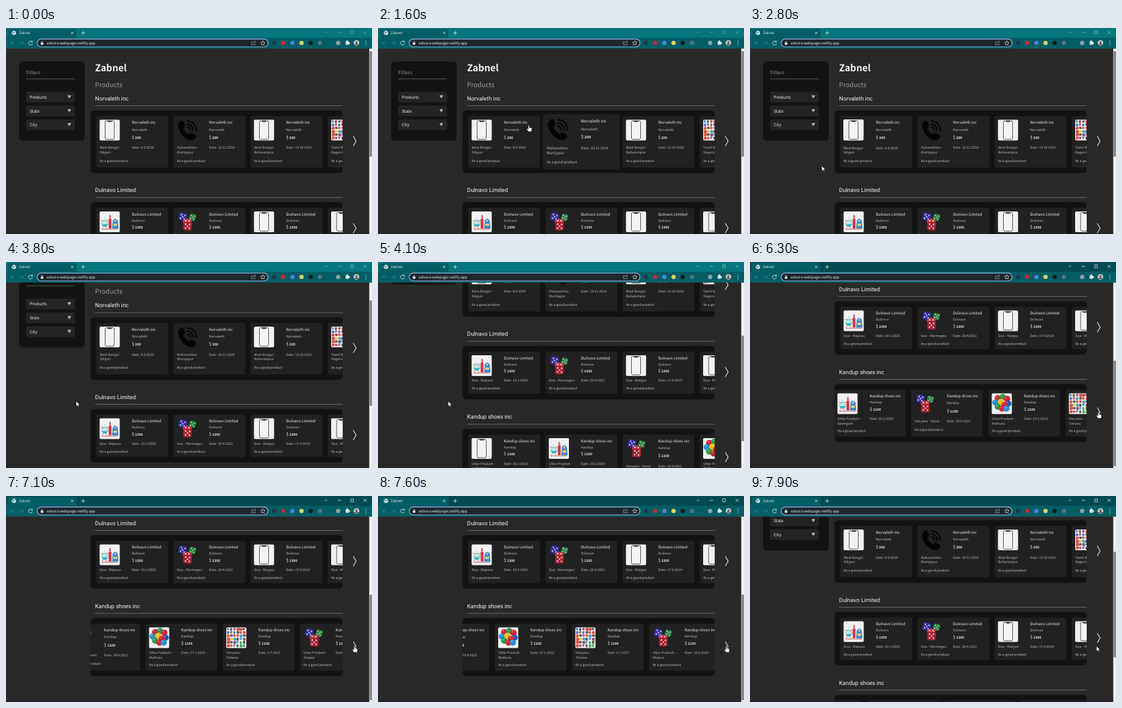
These frames come from a looping animation (600x338 px, 8 s). An HTML page:

```html
<!DOCTYPE html>
<html lang="en">
<head>
<meta charset="utf-8">
<title>Product page</title>
<style>
  html, body { margin: 0; width: 100%; height: 100%; overflow: hidden; background: #292829; }
  svg { display: block; width: 600px; height: 338px; text-rendering: geometricPrecision; }
  text { font-family: "Noto Sans CJK JP", "Noto Sans CJK SC", "Noto Sans", sans-serif; white-space: pre; }
  .ui { font-family: "Open Sans", "Noto Sans", sans-serif; }
  .head { font-family: Roboto, sans-serif; }
</style>
</head>
<body>
<svg id="stage" viewBox="0 0 600 338" xmlns="http://www.w3.org/2000/svg"></svg>
<script>
const LOOP = 8000, STEP = 100, PITCH = 126.5, CARD_W = 117.5, CARD_X = 148;

// --- drawing helpers -------------------------------------------------
const rect = (x, y, w, h, fill, r = 0, more = '') =>
  `<rect x="${x}" y="${y}" width="${w}" height="${h}" rx="${r}" fill="${fill}" ${more}/>`;
const circle = (x, y, r, fill, more = '') => `<circle cx="${x}" cy="${y}" r="${r}" fill="${fill}" ${more}/>`;
const line = (d, color, w = 1, more = '') =>
  `<path d="${d}" fill="none" stroke="${color}" stroke-width="${w}" ${more}/>`;
const shape = (d, fill, more = '') => `<path d="${d}" fill="${fill}" ${more}/>`;
const text = (x, y, size, fill, str, more = '') =>
  `<text x="${x}" y="${y}" font-size="${size}" fill="${fill}" ${more}>${str}</text>`;
const group = (body, more = '') => `<g ${more}>${body}</g>`;

function random(seed) {
  return () => (seed = (seed * 16807) % 2147483647) / 2147483647;
}

// --- product pictures, 33 x 34 ---------------------------------------
const paper = rect(0, 0, 33, 34, '#f1f1f1', 2);
const bright = ['#d8342c', '#2c62c8', '#e8c21c', '#2f9a4a', '#d8342c', '#2a8fd0', '#7a3c5a'];

function die(x, y, size, fill, angle) {
  const dots = [[.27, .27], [.73, .27], [.5, .5], [.27, .73], [.73, .73]]
    .map(([a, b]) => circle(a * size, b * size, size * .09, '#e3d5de')).join('');
  return group(rect(0, 0, size, size, fill, 3) + dots, `transform="translate(${x} ${y}) rotate(${angle})"`);
}

function balloons() {
  const spots = [[10, 8], [18, 6], [25, 9], [6, 15], [27, 17], [15, 14], [21, 19], [10, 22], [17, 25], [24, 25]];
  const colors = ['#d8232c', '#2f9a4a', '#d8232c', '#2a8fd0', '#2456b8', '#e8c21c'];
  return paper + spots.map(([x, y], i) => circle(x, y, 5.2, colors[i % 6]) +
    circle(x - 1.6, y - 1.9, 1, '#fff', 'opacity=".5"')).join('');
}

function groceries() {
  const rnd = random(77);
  let body = paper;
  for (let i = 0; i < 36; i++) {
    const w = 3 + rnd() * 2.2, h = 3.4 + rnd() * 1.8, x = 1.2 + (i % 6) * 5.2, y = 1 + Math.floor(i / 6) * 5.4;
    body += rect(x, y, w, h, i % 4 === 1 ? '#4a3a2e' : bright[Math.floor(rnd() * 7)], .8,
      `opacity=".85" transform="rotate(${rnd() * 40 - 20} ${x + 2} ${y + 2})"`);
  }
  return body;
}

const pictures = {
  phone: paper + rect(9, 1.8, 15, 30.5, '#f3f3f3', 2.4, 'stroke="#383838" stroke-width=".9"') +
    shape('M13 1.8h7v1q0 1-1 1h-5q-1 0-1-1z', '#383838'),
  call: shape('M3 6C5 2 9 0 11 3L13.5 9C14 11 12 12 10.5 13.5C13 19 16 22 20.500 24.500C22 22.500 23.500 21 25.500 22L31 25.500C33 27.500 31 31 27.500 33C16 37-1 19 3 6Z', '#060606') +
    line('M17 7.500Q26 8 27 18M18 12.500Q22 13 22.500 18M17 2.500Q31 3 32 18', '#060606', 2.2, 'stroke-linecap="round"'),
  lab: paper + line('M2 15h13M4 29L8 20L12 29', '#e0895c', 1.1) + rect(7, 10, 3, 6, '#cfe8ea') +
    circle(8.5, 20, 5, '#bfe6ea', 'stroke="#58b0bc" stroke-width=".7"') +
    shape('M3.700 21H13.300A4.900 4.900 0 0 1 3.700 21Z', '#35b3c7') +
    rect(14.8, 12, 4.6, 16, '#cf3848', 1) + rect(15.7, 6, 2.8, 6, '#d86a72', .8) +
    shape('M21.500 15Q25.500 9 29.500 15L31 28H20.500Z', '#3f84c4') + rect(22.5, 20, 6, 4, '#e9cf6a', .8) +
    circle(25.5, 15.5, 1.8, '#a9c8e4') + rect(3, 28.5, 27, 1.4, '#d0737c', .7),
  dice: die(5, 1, 13, '#3330a0', 14) + die(22, 3, 11, '#23803c', 16) +
    shape('M9.500 16L16 11.500L25 14L23 20L11 20Z', '#cc3a48') + die(11, 17, 14, '#ac2230', 3) +
    circle(14.5, 15.4, 1.2, '#e3d5de') + circle(20, 15.6, 1.2, '#e3d5de'),
  balloons: balloons(),
  groceries: groceries()
};

// --- page content ----------------------------------------------------
const rows = [
  { name: 'Norvaleth inc', brand: 'Norvaleth', price: 200, mid: 115, h: 84.5, ys: [10.5, 22.5, 35, 52, 73], cards: [
    ['phone', 'West Bengal -', 'Siliguri', '8:6:2020'],
    ['call', 'Maharashtra -', 'Murtijapur', '10:11:2014'],
    ['phone', 'West Bengal -', 'Baharampur', '13:10:2016'],
    ['groceries', 'Tamil Nadu -', 'Nagercoil', '4:2:2018']] },
  { name: 'Dulnavo Limited', brand: 'Dulnavo', price: 1300, mid: 265.5, h: 69.5, ys: [10.5, 21, 32, 47.5, 60], cards: [
    ['lab', 'Goa - Mapusa', '', '19:1:2020'],
    ['dice', 'Goa - Marmagao', '', '20:4:2021'],
    ['phone', 'Goa - Margao', '', '17:4:2014'],
    ['phone', 'Goa - Mapusa', '', '9:3:2016']] },
  { name: 'Kandup shoes inc', brand: 'Kandup', price: 1100, mid: 401.5, h: 77, ys: [10.5, 21, 32, 48, 67.3], cards: [
    ['phone', 'Uttar Pradesh -', 'Lakhimpur', '30:1:2013'],
    ['lab', 'Uttar Pradesh -', 'Azamgarh', '20:2:2020'],
    ['dice', 'Haryana - Hansi', '', '18:4:2021'],
    ['balloons', 'Uttar Pradesh -', 'Mathura', '27:1:2013'],
    ['groceries', 'Haryana -', 'Tohana', '5:7:2017'],
    ['dice', 'Uttar Pradesh -', 'Sitapur', '12:6:2019']] }
];

function card(row, [pic, place, town, date]) {
  const loose = !town && row.h > 70;
  const [a, b, c, d, e] = loose ? [10.5, 22, 35, 52, 65.5] : row.ys;
  const small = (x, y, str) => text(x, y + 2, 5.5, '#b8b8b8', str);
  return rect(0, 0, CARD_W, row.h, '#212121', 2) +
    group(pictures[pic], 'transform="translate(5.5 6)"') +
    text(58.3, a + 2.4, 6.25, '#f4f4f4', row.name, 'font-weight="500"') +
    small(58.3, b, row.brand) +
    text(58.3, c + 2.3, 7, '#f4f4f4', '$') +
    text(63.6, c + 2.2, 5.5, '#f4f4f4', row.price, 'font-weight="700"') +
    small(5.7, d, place) + small(5.7, d + 7.6, town) + small(58.3, d, 'Date: ' + date) +
    text(5.7, e + 2.3, 5.5, '#c4c4c4', 'Its a good product');
}

function section(row, r) {
  const top = row.mid + 20.2, boxH = row.h + 18.4, cy = top + boxH / 2 - 1.2;
  const cards = row.cards.map((c, i) => group(
    group(card(row, c), `id="card${r}${i}"`),
    `transform="translate(${CARD_X + i * PITCH} ${row.mid + 29.4})"`)).join('');
  return text(146, row.mid + 3.5, 9.375, '#f4f4f4', row.name, 'class="head"') +
    rect(146, row.mid + 12.2, 406, .8, '#777') +
    rect(138.5, top, 413.5, boxH, '#131313', 6) +
    `<clipPath id="clip${r}">${rect(138.5, top, 413.5, boxH, '#000', 6)}</clipPath>` +
    group(group(cards, `id="track${r}"`), `clip-path="url(#clip${r})"`) +
    line(`M569.300 ${cy - 8}L574 ${cy}L569.300 ${cy + 8}`, '#f2f2f2', 1.1);
}

function sidebar() {
  const selects = ['Products', 'State', 'City'].map((label, i) => {
    const y = 113.3 + i * 22.8;
    return rect(33, y - 8.8, 80, 17.6, '#242424', 2) + text(39, y + 2.4, 6.7, '#f2f2f2', label) +
      shape(`M100.700 ${y - 2.8}h6.200l-3.100 5.200z`, '#b4b4b4');
  }).join('');
  return rect(21.5, 55, 107.5, 130, '#131313', 6) + text(33, 76, 8.1, '#8e8e8e', 'Filters') +
    rect(33, 83.2, 80, .8, '#6c6c6c') + selects;
}

function browser() {
  const pale = '#d5e6e8', faint = '#3a8087', bar = '#035e66';
  const icons = [[440, '#20394a'], [455, '#d3262e'], [470, '#4b86d8'], [485, '#e3d26c'], [500, '#1a1a1c'],
    [515, '#58747a'], [545, '#8fa3a8']].map(([x, c]) => circle(x - .5, 24.5, 3.5, c)).join('');
  return rect(0, 0, 600, 17, '#05777d', 0, 'id="strip"') +
    shape('M2 17V5Q2 1.500 5.500 1.500H112Q115.500 1.500 115.500 5V17Z', bar) +
    rect(0, 16, 600, 17.7, bar) +
    circle(13, 8, 3.6, pale) + line('M10 7Q13 9 16 6M12 11Q13 8 11 5', '#3b747c', .8) +
    text(21, 10.3, 6, '#f2f8f8', 'Zabnel', 'class="ui"') +
    line('M106.500 6l4 4m0-4l-4 4M126.500 5v6m-3-3h6', pale, .9) +
    line('M14 24.500H7.500m3-3l-3 3l3 3M22 24.500h6.500m-3-3l3 3l-3 3', faint, .9) +
    line('M42.600 22.500A3.200 3.200 0 1 0 43.300 25.500M43.200 20.800v2.300h-2.400', pale, .9) +
    rect(51.2, 18.2, 378.3, 12.8, '#1d272d', 6.4, 'stroke="#9bb9e6" stroke-width="1.2"') +
    rect(57, 24, 4.2, 3.4, pale, .5) + line('M57.900 24v-1a1.200 1.200 0 0 1 2.400 0v1', pale, .7) +
    text(67, 26.7, 6.15, '#f2f4f5', 'edvora-webpage.netlify.app', 'class="ui"') +
    line('M405 22.500h-2.500v5h6v-2M404.500 25.500q.5-3 4.500-3m-1.800-1.700l1.900 1.700l-1.900 1.700', '#98a6aa', .7) +
    shape('M421 20.800l1.100 2.400l2.600.300l-1.900 1.800l.5 2.600l-2.300-1.300l-2.300 1.300l.5-2.600l-1.900-1.800l2.600-.300z', 'none', 'stroke="#d8dee0" stroke-width=".8"') +
    icons +
    rect(556.800, 22, 5.6, 5.6, pale, .8) + circle(559.6, 21.6, 1.4, pale) + circle(562.8, 24.8, 1.4, pale) +
    circle(574.5, 24.5, 4.6, '#c3cccf') + circle(574.5, 23.3, 1.6, '#6c5a52') +
    shape('M571.500 28a3 3 0 0 1 6 0z', '#6c5a52') +
    [21.5, 24.5, 27.5].map(y => circle(590, y, .75, pale)).join('') +
    group(line('M522.500 6l2 2l2-2M544 7.200h5.500M565 4.800h4.600v4.600h-4.600zM586.300 4.700l4.800 4.800m0-4.800l-4.800 4.800', '#fff', .8), 'id="controls"');
}

const arrow = shape('M0 0V8.300L2 6.500L3.300 9.500L4.700 8.900L3.400 6H6Z', '#fff', 'stroke="#111" stroke-width=".6"');
const hand = shape('M-.800 1C-.800-.300 .900-.300 .900 1V4L4.500 4.900Q5.500 5.200 5.400 6.500L4.700 11H-.500L-3.200 7Q-3.500 5.800-2.300 5.900L-.800 7Z', '#fff', 'stroke="#111" stroke-width=".6"');

const stage = document.getElementById('stage');
stage.innerHTML = rect(0, 0, 600, 338, '#292829') +
  group(sidebar() + text(146, 71.3, 15.4, '#f2f2f2', 'Zabnel', 'font-weight="700"') +
    text(146, 96.5, 10.7, '#9c9c9c', 'Products') + rows.map(section).join(''), 'id="page"') +
  rect(595.5, 33.5, 4.5, 304.5, '#f1f1f1') + rect(595.5, 38, 4.5, 173, '#8a8a8a', 0, 'id="thumb"') +
  browser() + group(arrow, 'id="arrow"') + group(hand, 'id="hand"');

// --- motion ----------------------------------------------------------
const $ = id => document.getElementById(id);
const move = (id, x, y) => $(id).setAttribute('transform', `translate(${x} ${y})`);
const clamp = v => Math.min(1, Math.max(0, v));
const smooth = v => v * v * (3 - 2 * v);

const scrollKeys = [[3600, 0], [3700, 14], [3800, 44.5], [4000, 118], [4200, 178], [4500, 221.5],
  [7600, 221.5], [7700, 204], [7900, 95.5], [8000, 72]];
const cursorKeys = [[1000, 450, -2], [1200, 468, 188], [1400, 345, 184], [1600, 247, 159], [1800, 117, 190],
  [1900, 124, 190], [2100, 300, 186], [2300, 470, 188], [2500, 250, 200], [2700, 120, 224], [2900, 115, 228.5],
  [4500, 115, 228.5], [4600, 165, 236], [4800, 300, 242], [4900, 300, 242], [5200, 500.5, 256.5],
  [5600, 571, 245.5], [7600, 571, 245.5], [7700, 568, 246.5]];
// row, card, enter, leave
const hovers = [[0, 2, 1100, 1250], [0, 1, 1250, 1600], [0, 0, 1600, 1750], [0, 0, 1900, 2050], [0, 1, 2050, 2250],
  [0, 2, 2250, 2400], [0, 1, 2400, 2480], [0, 0, 2480, 2660], [2, 0, 4600, 4720], [2, 1, 4720, 5050], [2, 2, 5100, 5250]];
const clicks = [5938, 6753];

function at(keys, t, col = 1) {
  const i = keys.findIndex(k => k[0] > t);
  if (i === 0) return keys[0][col];
  if (i < 0) return keys[keys.length - 1][col];
  const a = keys[i - 1], b = keys[i];
  return a[col] + (b[col] - a[col]) * (t - a[0]) / (b[0] - a[0]);
}

function hoverAmount(r, i, t) {
  return hovers.reduce((best, [row, c, from, to]) => {
    if (row !== r || c !== i) return best;
    const peak = clamp((Math.min(t, to) - from) / 300);
    return Math.max(best, peak - clamp((t - to) / 300));
  }, 0);
}

function draw(t) {
  const scroll = at(scrollKeys, t);
  move('page', 0, -scroll);
  move('thumb', 0, scroll * .56);
  move('track2', clicks.reduce((x, start) => x - 168 * smooth(clamp((t - start) / 500)), 0), 0);

  rows.forEach((row, r) => row.cards.forEach((c, i) => {
    const k = .07 * hoverAmount(r, i, t);
    $(`card${r}${i}`).setAttribute('transform',
      `translate(${-k * CARD_W / 2} ${-k * row.h / 2}) scale(${1 + k})`);
  }));

  const x = at(cursorKeys, t), y = at(cursorKeys, t, 2);
  const onCard = x > 148 && x < 518 && y > 144;
  const onNext = t >= 5500 && t < 7700;
  const pointing = onCard || onNext;
  move('hand', x, y);
  move('arrow', x, y);
  $('hand').style.display = t >= 1000 && pointing ? '' : 'none';
  $('arrow').style.display = t >= 1000 && !pointing ? '' : 'none';

  // The window takes focus with the first click on the arrow.
  const focused = t >= 5900;
  $('strip').setAttribute('fill', focused ? '#034a50' : '#05777d');
  $('controls').style.opacity = focused ? .9 : t < 2800 ? .35 : .55;
}

const start = performance.now();
function tick(now) {
  const t = Math.max(0, now - start) % LOOP;
  draw(Math.floor(t / STEP) * STEP);
  requestAnimationFrame(tick);
}
draw(0);
requestAnimationFrame(tick);
</script>
</body>
</html>
```
